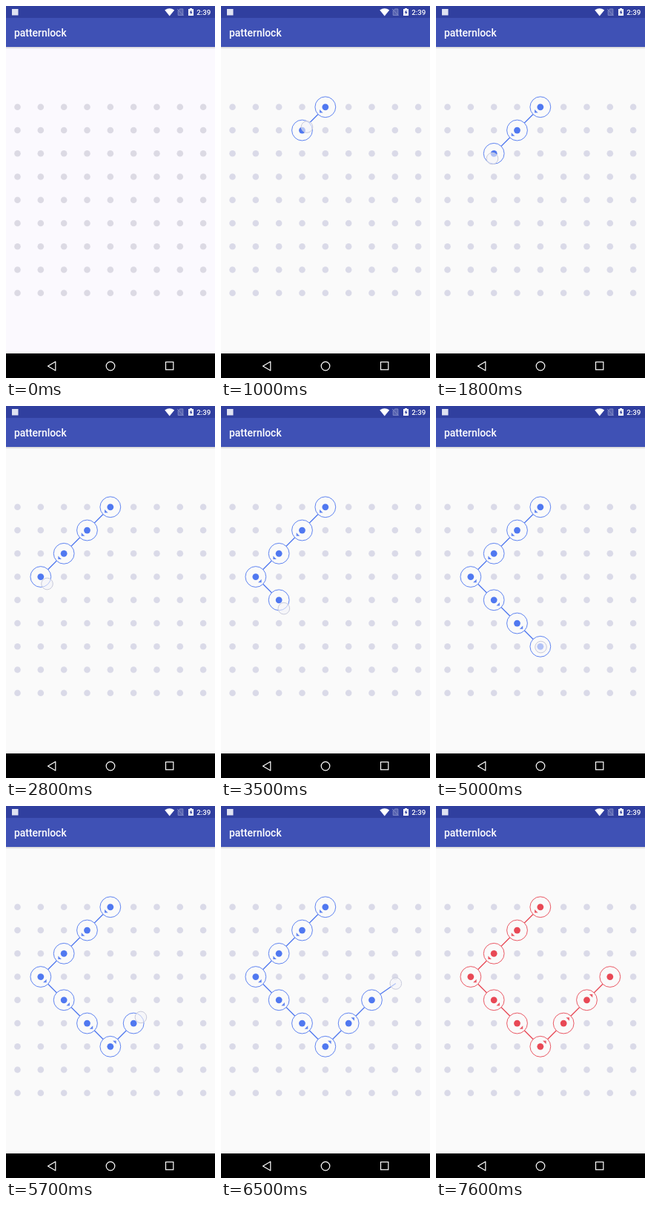
Write an HTML page that moves like this. It is 282 px wide and 500 px high and loops after 7.8 s.

```html
<!DOCTYPE html>
<html lang="en">
<head>
<meta charset="utf-8">
<title>Pattern lock</title>
<style>
  html, body { margin: 0; width: 100%; height: 100%; overflow: hidden; background: #fafafa; }
  svg { display: block; width: 282px; height: 500px; }
  text { font-family: Roboto, sans-serif; font-weight: 500; fill: #fff; }
  .ink { --ink: #5078f0; }
  .ink.wrong { --ink: #e84855; }
  .ink line { stroke: var(--ink); stroke-width: 1.3; }
  .ring { fill: #fafafa; stroke: var(--ink); stroke-width: .9; }
  .core, .arrow { fill: var(--ink); }
  .arrow { opacity: .9; }
  .nav { fill: none; stroke: #fff; stroke-width: 1.2; }
</style>
</head>
<body>
<svg viewBox="0 0 282 500">
  <defs>
    <linearGradient id="shade" x1="0" y1="0" x2="0" y2="1">
      <stop offset="0" stop-color="#000" stop-opacity=".16"/>
      <stop offset="1" stop-color="#000" stop-opacity="0"/>
    </linearGradient>
  </defs>
  <rect id="page" width="282" height="500"/>
  <g id="grid"></g>
  <g id="trail" class="ink"></g>
  <circle id="touch" r="7.8" fill="#f4f4f9" fill-opacity=".6" stroke="#c9cbdc"/>

  <rect y="55" width="282" height="3" fill="url(#shade)"/>
  <rect y="16" width="282" height="39" fill="#3f51b5"/>
  <rect width="282" height="16" fill="#303f9f"/>
  <text x="11" y="41" font-size="13.9">patternlock</text>
  <text x="257.2" y="11.8" font-size="9.7">2:39</text>
  <rect x="8" y="4" width="8.5" height="8.5" fill="#dfe2f2"/>
  <path d="M214.2 5.6Q220.7 .8 227.2 5.6L220.7 13.4Z" fill="#fff"/>
  <g stroke="#7f89c6" fill="#5662b0">
    <path d="M234.5 4H238.8V12.4H232.2V6.4Z"/>
    <path d="M231 4L239.6 13"/>
  </g>
  <path d="M248 3H251V4H253V13H246V4H248Z" fill="#fff"/>
  <path d="M250.2 5.3L247.7 9H249.2V11.8L251.5 8H250.2Z" fill="#303f9f"/>

  <rect y="467" width="282" height="33"/>
  <g class="nav">
    <path d="M56.5 484L66.8 478V490Z" stroke-linejoin="round"/>
    <circle cx="141" cy="484" r="5.8"/>
    <rect x="215.5" y="478.5" width="10.3" height="10.3"/>
  </g>
</svg>
<script>
const LOOP = 7800, STEP = 100, START = 500, LIFT = 6900, REACH = 8.5;
const NS = 'http://www.w3.org/2000/svg';
const byId = id => document.getElementById(id);
const place = (col, row) => ({ x: 15.5 + 31.33 * col, y: 135.8 + 31.25 * row });

function add(parent, tag, attrs = {}) {
  return set(parent.appendChild(document.createElementNS(NS, tag)), attrs);
}
function set(el, attrs) {
  for (const key in attrs) el.setAttribute(key, attrs[key]);
  return el;
}
const show = (el, on) => { el.style.display = on ? '' : 'none'; };

// finger turning points: time, x, y
const turns = [
  [START, 141, 136], [1800, 76, 205], [2450, 46, 231], [2800, 55.5, 239],
  [4100, 110, 300.5], [5000, 141.5, 324], [6100, 205, 261],
  [6500, 235.8, 238.5], [6700, 235.5, 230]
];

function fingerAt(t) {
  const i = turns.findIndex(p => p[0] > t);
  if (i < 0) return { x: turns.at(-1)[1], y: turns.at(-1)[2] };
  const [t0, x0, y0] = turns[i - 1], [t1, x1, y1] = turns[i];
  const k = (t - t0) / (t1 - t0);
  return { x: x0 + (x1 - x0) * k, y: y0 + (y1 - y0) * k };
}

// zigzag of ten nodes, each caught once the finger comes close
const nodes = Array.from({ length: 10 }, (_, i) =>
  place(1 + Math.abs(i - 3), 6 - Math.abs(i - 6)));

let caught = 0;
for (let t = START; t < LIFT && caught < nodes.length; t += STEP) {
  const f = fingerAt(t), n = nodes[caught];
  if (Math.hypot(f.x - n.x, f.y - n.y) < REACH) {
    n.at = t;
    caught++;
  }
}

const grid = byId('grid'), trail = byId('trail'), touch = byId('touch'), page = byId('page');
for (let row = 0; row < 9; row++)
  for (let col = 0; col < 9; col++) {
    const p = place(col, row);
    add(grid, 'circle', { cx: p.x, cy: p.y, r: 4.3 });
  }

const span = (a, b) => ({ x1: a.x, y1: a.y, x2: b.x, y2: b.y });
const lead = add(trail, 'line');
const links = nodes.slice(1).map((n, i) => add(trail, 'line', span(nodes[i], n)));
const marks = nodes.map(n => {
  const mark = add(trail, 'g', { transform: `translate(${n.x} ${n.y})` });
  add(mark, 'circle', { class: 'ring', r: 13.9 });
  add(mark, 'circle', { class: 'core', r: 4.4 });
  return mark;
});
const arrows = nodes.slice(1).map((n, i) => {
  const turn = Math.atan2(n.y - nodes[i].y, n.x - nodes[i].x) * 180 / Math.PI;
  return add(marks[i], 'path', { class: 'arrow', d: 'M11 0L7.8 3.2V-3.2Z', transform: `rotate(${turn})` });
});

function draw(t) {
  const idle = t < START, held = !idle && t < LIFT;
  const count = nodes.filter(n => n.at <= t).length;
  set(page, { fill: idle ? '#fbf9fe' : '#fafafa' });
  set(grid, { fill: idle ? '#dcdae4' : '#dadae8' });
  trail.classList.toggle('wrong', t >= LIFT);
  marks.forEach((el, i) => show(el, i < count));
  [links, arrows].forEach(set => set.forEach((el, i) => show(el, i < count - 1)));
  show(touch, held);
  show(lead, held);
  if (!held) return;
  const f = fingerAt(t);
  set(touch, { cx: f.x, cy: f.y });
  set(lead, span(nodes[count - 1], f));
}

const begin = performance.now();
function tick() {
  const t = (performance.now() - begin) % LOOP;
  draw(Math.floor(t / STEP) * STEP);
  requestAnimationFrame(tick);
}
tick();
</script>
</body>
</html>
```
